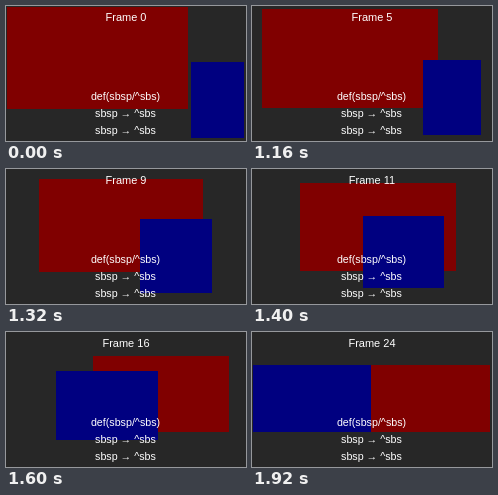
These frames come from a looping animation (240 px wide and 135 px high, 2920 ms). An HTML page:

```html
<!DOCTYPE html>
<html lang="en">
<head>
<meta charset="utf-8">
<title>Two panels</title>
<style>
  html, body { margin: 0; width: 240px; height: 135px; overflow: hidden; background: #272727; }
  svg { position: absolute; left: 0; top: 0; }
  p {
    position: absolute; left: 0; width: 239px; margin: 0;
    font: 10.7px/13px "Liberation Sans", Arial, sans-serif;
    color: #fff; text-align: center; white-space: pre;
  }
  #title { width: 240px; font-size: 11px; }
  i { font: normal 1em/0 "Noto Sans", sans-serif; }
</style>
</head>
<body>
<svg width="240" height="135">
  <rect id="red" fill="#800000"/>
  <rect id="blue" fill="#000080"/>
</svg>
<p id="title" style="top:5px">Frame 0</p>
<p style="top:84px">def(sbsp/^sbs)</p>
<p style="top:101px">sbsp <i>→</i> ^sbs</p>
<p style="top:118px">sbsp <i>→</i> ^sbs</p>
<script>
  const LOOP = 2920, HOLD = 1000, STEP = 40, LAST = 24;
  const byId = id => document.getElementById(id);
  const mix = (a, b, p) => a + (b - a) * p;

  // A box travels by its centre, while its height and aspect ratio change evenly.
  const box = (left, top, right, bottom) => ({
    cx: (left + right) / 2,
    cy: (top + bottom) / 2,
    height: bottom - top,
    aspect: (right - left) / (bottom - top)
  });

  const panels = [
    { el: byId('red'), from: box(1, 1, 182, 103), to: box(119, 33, 238, 100) },
    { el: byId('blue'), from: box(185, 56, 238, 132), to: box(1, 33, 119, 100) }
  ];

  function place({ el, from, to }, p) {
    const at = key => mix(from[key], to[key], p);
    const height = at('height'), width = height * at('aspect');
    el.setAttribute('x', Math.round(at('cx') - width / 2));
    el.setAttribute('y', Math.round(at('cy') - height / 2));
    el.setAttribute('width', Math.round(width));
    el.setAttribute('height', Math.round(height));
  }

  let shown = -1;
  function show(n) {
    if (n === shown) return;
    shown = n;
    const u = Math.max(0, n - 1) / (LAST - 1);
    const eased = (1 - Math.cos(Math.PI * u)) / 2;
    panels.forEach(panel => place(panel, eased));
    byId('title').textContent = 'Frame ' + n;
  }

  const start = performance.now();
  function tick() {
    const t = (performance.now() - start) % LOOP;
    show(t < HOLD ? 0 : Math.min(LAST, 1 + Math.floor((t - HOLD) / STEP)));
    requestAnimationFrame(tick);
  }
  tick();
</script>
</body>
</html>
```
